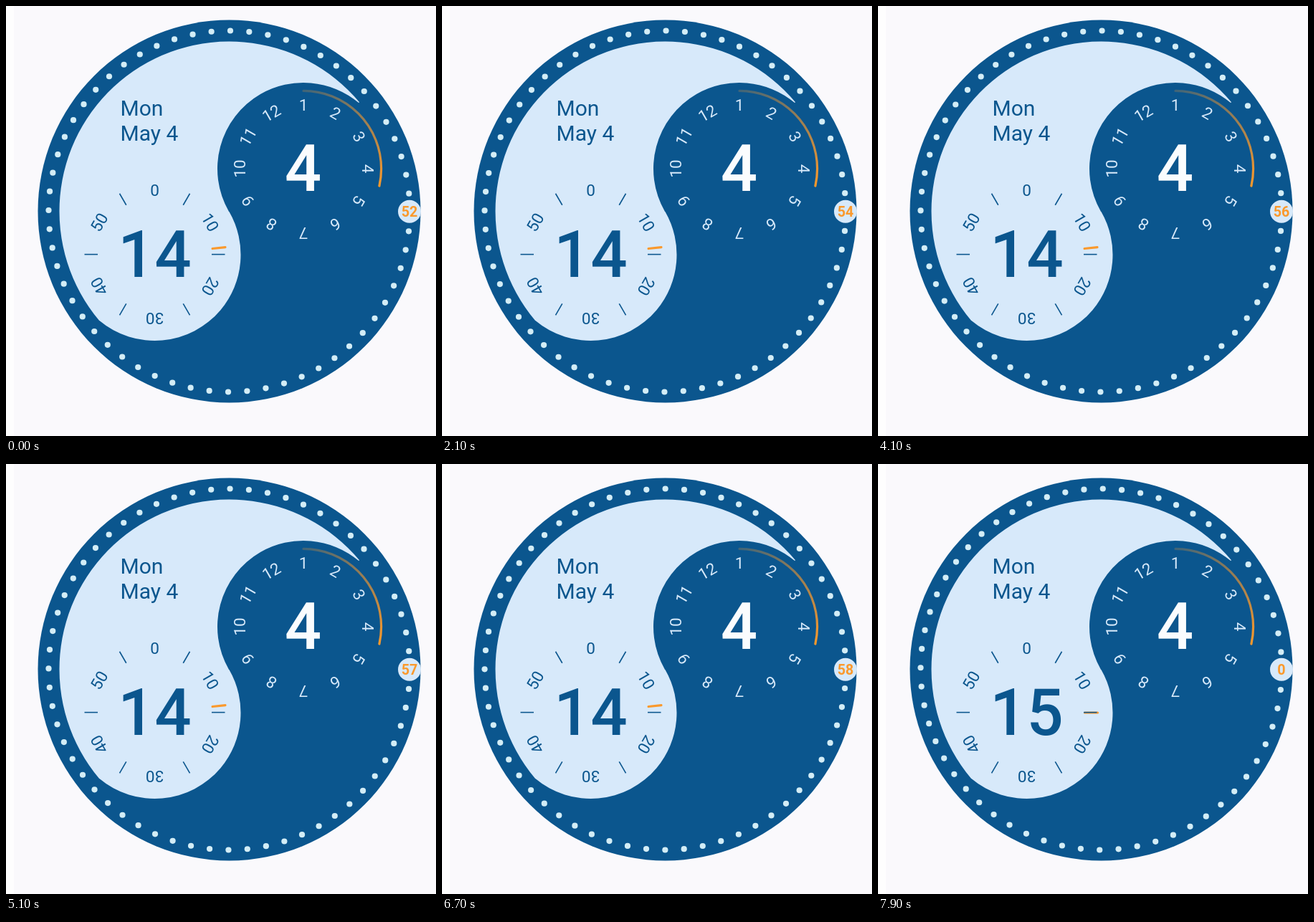
Recreate the animation shown at these times as an HTML page with a canvas. Size 600 by 600 pixels, loop 8 s.

```html
<!DOCTYPE html>
<html lang="en">
<head>
<meta charset="utf-8">
<title>Yin-yang clock</title>
<style>
html, body { margin: 0; width: 100%; height: 100%; overflow: hidden; background: #faf9fc; }
canvas { display: block; width: 600px; height: 600px; }
</style>
</head>
<body>
<canvas id="clock" width="600" height="600"></canvas>
<script>
const ctx = document.getElementById('clock').getContext('2d');
const DARK = '#0b568e', LIGHT = '#d7e9fa', ORANGE = '#fa992c', DOT = '#d3edf6';
const TAU = Math.PI * 2, LOOP = 8000;
const face = { x: 311.5, y: 286.5 };
const hours = { x: 415, y: 227 };
const minutes = { x: 207.5, y: 347 };
const rad = deg => deg * Math.PI / 180;

function disc(x, y, r, color) {
  ctx.fillStyle = color;
  ctx.beginPath();
  ctx.arc(x, y, r, 0, TAU);
  ctx.fill();
}

function label(text, x, y, size, weight, color, align = 'center') {
  ctx.font = `${weight} ${size}px Roboto, sans-serif`;
  ctx.textAlign = align;
  ctx.fillStyle = color;
  ctx.fillText(text, x, y);
}

// Runs draw with the origin at c and "up" pointing to the given clock angle.
function turned(c, deg, draw) {
  ctx.save();
  ctx.translate(c.x, c.y);
  ctx.rotate(rad(deg));
  draw();
  ctx.restore();
}

function spoke(c, deg, from, to, width, color, cap = 'butt') {
  turned(c, deg, () => {
    ctx.strokeStyle = color;
    ctx.lineWidth = width;
    ctx.lineCap = cap;
    ctx.beginPath();
    ctx.moveTo(0, -from);
    ctx.lineTo(0, -to);
    ctx.stroke();
  });
}

function drawFace() {
  ctx.fillStyle = '#faf9fc';
  ctx.fillRect(0, 0, 600, 600);
  ctx.fillStyle = '#fefefe';
  ctx.fillRect(0, 0, 11, 600);
  disc(face.x, face.y, 267, DARK);

  ctx.fillStyle = LIGHT;
  ctx.beginPath();
  ctx.arc(face.x, face.y, 237, rad(-40), rad(140), true);
  ctx.arc(minutes.x, minutes.y, 120, rad(130), rad(-30), true);
  ctx.arc(hours.x, hours.y, 120, rad(150), rad(310));
  ctx.fill();

  label('Mon', 159.5, 153, 30, 400, DARK, 'left');
  label('May 4', 159.5, 188, 30, 400, DARK, 'left');
}

function drawHours() {
  for (let h = 1; h <= 12; h++) {
    turned(hours, (h - 1) * 30, () => label(h, 0, -81.5, 22.5, 400, LIGHT));
  }
  label(4, 414.5, 257.5, 90, 500, '#fafcfe');

  const start = rad(-90), end = rad(12.8);
  const fade = ctx.createConicGradient(start, hours.x, hours.y);
  fade.addColorStop(0, 'rgba(250,153,44,.22)');
  fade.addColorStop((end - start) / TAU, ORANGE);
  fade.addColorStop(0.5, ORANGE);
  fade.addColorStop(1, 'rgba(250,153,44,.22)');
  ctx.strokeStyle = fade;
  ctx.lineWidth = 3.2;
  ctx.lineCap = 'round';
  ctx.beginPath();
  ctx.arc(hours.x, hours.y, 108.6, start, end);
  ctx.stroke();
}

function drawMinutes(minute) {
  spoke(minutes, minute * 6, 81, 99, 3.2, ORANGE, 'round');
  const dial = { x: minutes.x, y: 346.6 };
  for (let m = 0; m < 60; m += 5) {
    if (m % 10) spoke(dial, m * 6, 79.5, 98, 1.6, DARK);
    else turned(dial, m * 6, () => label(m, 0, -81.5, 22.5, 400, DARK));
  }
  label(minute, minutes.x, 377.5, 90, 500, DARK);
}

function drawSeconds(second, phase) {
  // A quick step to the next dot that settles slowly.
  const lag = 5.25 * Math.exp(-phase / 0.03) + 0.75 * Math.exp(-phase / 0.3);
  for (let i = 0; i < 60; i++) {
    const a = rad(i * 6 + lag);
    disc(face.x + 252 * Math.cos(a), face.y + 252 * Math.sin(a), 4.1, DOT);
  }
  disc(563, 286.7, 16, LIGHT);
  label(second, 563, 293.6, 19.7, 700, ORANGE);
}

function frame(now) {
  const time = 52.24 + (now % LOOP) / 1000;
  const whole = Math.floor(time);
  drawFace();
  drawHours();
  drawMinutes(14 + Math.floor(whole / 60));
  drawSeconds(whole % 60, time - whole);
  requestAnimationFrame(() => frame(performance.now() - began));
}

const began = performance.now();
frame(0);
</script>
</body>
</html>
```
